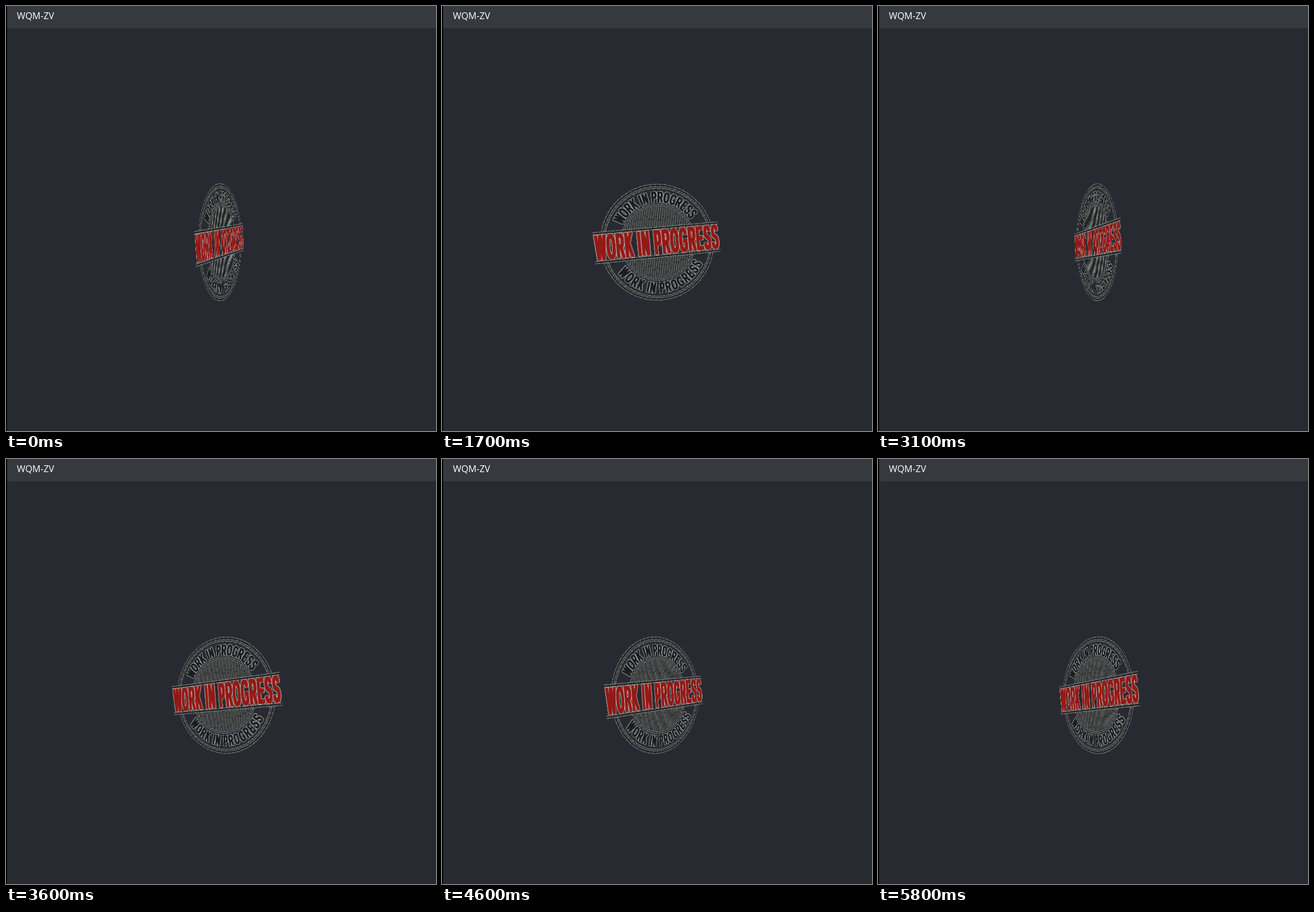
These frames come from a looping animation (753x744 px, 5.9 s). An HTML page with a canvas:

```html
<!DOCTYPE html>
<html lang="en">
<head>
<meta charset="utf-8">
<title>Work in progress</title>
<style>
  html, body { margin: 0; width: 100%; height: 100%; overflow: hidden; background: #282a31; }
  header {
    position: absolute; left: 0; top: 0; right: 0; height: 39px;
    background: #36393d; color: #fff;
    font: 16px/34px "Open Sans", "Noto Sans", sans-serif; text-indent: 19px;
  }
  body::after { content: ""; position: absolute; left: 0; top: 0; width: 2px; height: 100%; background: #050506; }
  canvas { position: absolute; left: 259px; top: 308px; }
</style>
</head>
<body>
<header>WQM-ZV</header>
<canvas id="stamp" width="241" height="211" role="img" aria-label="Work in progress stamp"></canvas>
<script>
const LOOP = 5900, STEP = 100, DEPTH = 743;
const LIGHT = '#c9c9c2', LINE = '#a3a39d', DARK = '#1b1e20', RED = '#921a17';
const TEXT = 'WORK IN PROGRESS';
const stamp = document.getElementById('stamp');
const ctx = stamp.getContext('2d');

// Turn in degrees at given ms: 0 is edge-on, 90 is facing the viewer.
const turns = [
  [0, -21.6], [600, 18.4], [1000, 48.5], [1200, 61], [1800, 110.4], [2300, 146.1],
  [2400, 152.6], [3100, 200.8], [3600, 237], [4000, 260.5], [4200, 282.8],
  [4800, 326.2], [5200, 349.2], [5800, 397.2]
];

let seed = 7;
const random = () => (seed = seed * 16807 % 2147483647) / 2147483647;

function saved(draw) {
  ctx.save();
  draw();
  ctx.restore();
}

function circle(r) {
  ctx.beginPath();
  ctx.arc(0, 0, r, 0, 7);
}

function line(x1, y1, x2, y2) {
  ctx.beginPath();
  ctx.moveTo(x1, y1);
  ctx.lineTo(x2, y2);
  ctx.stroke();
}

// One condensed letter, thickened sideways by `bold`, with a light rim.
function letter(char, squeeze, bold, fill) {
  for (const [color, rim] of [[LIGHT, 0.6], [fill, 0]]) {
    ctx.fillStyle = color;
    const reach = bold + rim;
    for (const dy of rim ? [-rim, 0, rim] : [0])
      for (let i = -3; i <= 3; i++) saved(() => {
        ctx.translate(reach * i / 3, dy);
        ctx.scale(squeeze, 1);
        ctx.fillText(char, 0, 0);
      });
  }
}

// Calls move(offset) to place each letter of the centred line.
function lettering(size, squeeze, tracking, bold, fill, move) {
  ctx.font = `bold ${size}px "Liberation Sans", Arial, sans-serif`;
  ctx.textAlign = 'center';
  const widths = [...TEXT].map(c => ctx.measureText(c).width * squeeze + tracking);
  let x = -widths.reduce((a, b) => a + b) / 2;
  [...TEXT].forEach((char, i) => {
    saved(() => {
      move(x + widths[i] / 2);
      letter(char, squeeze, bold, fill);
    });
    x += widths[i];
  });
}

function ringText(side, baseline) {
  lettering(27, 0.5, 1.6, 1, DARK, x => {
    ctx.rotate(side * x / 79.5);
    ctx.translate(0, -side * baseline);
  });
}

function drawStamp() {
  ctx.translate(120.5, 105.5);
  ctx.rotate(-5.3 * Math.PI / 180);

  saved(() => {
    ctx.strokeStyle = DARK;
    ctx.lineWidth = 4;
    circle(99.5);
    ctx.stroke();
  });

  ctx.strokeStyle = LINE;
  saved(() => {
    ctx.setLineDash([5, 1, 2, 1]);
    for (const r of [101.4, 97.5, 94.5, 66.5, 63.5]) {
      circle(r);
      ctx.stroke();
    }
  });

  saved(() => {
    circle(62);
    ctx.clip();
    ctx.fillStyle = DARK;
    ctx.fill();
    for (let x = -62; x < 63; x += 3.2) {
      ctx.setLineDash([10 + 16 * random(), 1]);
      line(x, -63, x, 63);
    }
  });

  ringText(1, 70);
  ringText(-1, 89);

  // worn specks on the rim
  ctx.fillStyle = LINE;
  for (let i = 0; i < 40; i++) {
    const a = random() * 7, r = 92 + 8 * random();
    ctx.fillRect(r * Math.cos(a), r * Math.sin(a), 1, 1);
  }

  ctx.clearRect(-113, -27, 226, 54);
  ctx.fillStyle = DARK;
  ctx.setLineDash([9, 1, 4, 1]);
  for (const y of [-26.5, 22.8]) {
    ctx.fillRect(-113, y, 226, 3.7);
    line(-113, y, 113, y);
    line(-113, y + 3.7, 113, y + 3.7);
  }
  lettering(62, 0.3, 1.8, 1.6, RED, x => ctx.translate(x, 21));
}

function turnAt(t) {
  const i = Math.max(1, turns.findIndex(k => k[0] >= t));
  const [t0, a0] = turns[i - 1], [t1, a1] = turns[i];
  return a0 + (a1 - a0) * (t - t0) / (t1 - t0);
}

function frame() {
  const t = Math.floor(performance.now() % LOOP / STEP) * STEP;
  // Both faces read the same way, so the turn wraps every half revolution.
  const angle = (turnAt(t) + 180) % 180 - 90;
  stamp.style.transform = `perspective(${DEPTH}px) rotateY(${angle}deg)`;
  requestAnimationFrame(frame);
}

drawStamp();
frame();
</script>
</body>
</html>
```
